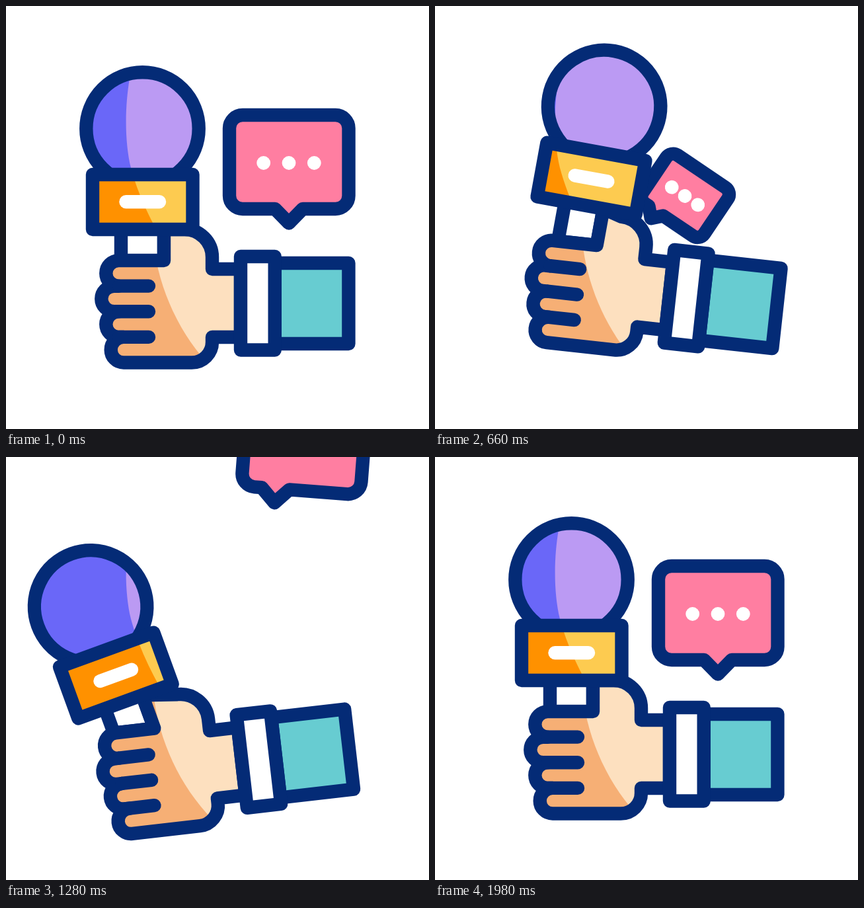
An HTML page with a canvas for the animation above (2400 ms loop, 640 by 640 pixels).

```html
<!DOCTYPE html>
<html lang="en">
<head>
<meta charset="utf-8">
<title>Interview microphone</title>
<style>
  html, body { margin: 0; width: 100%; height: 100%; overflow: hidden; background: #fff; }
  canvas { display: block; }
</style>
</head>
<body>
<canvas id="stage" width="640" height="640"></canvas>
<script>
const ctx = document.getElementById('stage').getContext('2d');
const LOOP = 2400, STEP = 20, LINE = 20.4;
const NAVY = '#042b76', PINK = '#ff7ea1', TEAL = '#67ccd1', WHITE = '#fff';
const BALL = ['#6a67f8', '#bb9af3'], BAND = ['#ff9100', '#fdcb50'], SKIN = ['#f6af75', '#fde0bf'];

// Lit areas stay still on the stage while the shapes pass over them.
const micLight = new Path2D('M200 0L187 110C180 150 179 205 189 245C197 275 209 303 224 332L240 362L640 362L640 0Z');
const handLight = new Path2D('M219 300L222 345C227 420 260 495 312 548L330 565L420 565L420 300Z');

const rad = deg => deg * Math.PI / 180;
const mix = (a, b, p) => a + (b - a) * p;

// cubic-bezier(.5, 0, .5, 1)
function ease(u) {
  let lo = 0, hi = 1;
  for (let i = 0; i < 24; i++) {
    const s = (lo + hi) / 2;
    if (1.5 * s * (1 - s) + s ** 3 < u) lo = s; else hi = s;
  }
  return lo * lo * (3 - 2 * lo);
}

function track(t, times, values, curve = u => u) {
  if (t >= times[times.length - 1]) return values[values.length - 1];
  const i = times.findIndex(x => t < x) - 1;
  return mix(values[i], values[i + 1], curve((t - times[i]) / (times[i + 1] - times[i])));
}

const swing = (t, right, left) => track(t, [0, 430, 1010, 1900], [0, right, left, 0], ease);

function outline(path) {
  ctx.stroke(path);
}

function shape(path, fill) {
  ctx.fillStyle = fill;
  ctx.fill(path);
  outline(path);
}

function litShape(path, [dark, light], region) {
  ctx.fillStyle = dark;
  ctx.fill(path);
  ctx.save();
  ctx.clip(path);
  ctx.resetTransform();
  ctx.fillStyle = light;
  ctx.fill(region);
  ctx.restore();
  outline(path);
}

function box(x0, y0, x1, y1) {
  const p = new Path2D();
  p.rect(x0, y0, x1 - x0, y1 - y0);
  return p;
}

function disc(x, y, r) {
  const p = new Path2D();
  p.arc(x, y, r, 0, 2 * Math.PI);
  return p;
}

function bubblePose(t) {
  if (t < 440) return { x: 428, y: 237.5 - 345 * (t / 440) ** 1.4, turn: 0, size: 1, tail: 0 };
  if (t < 1450) {
    const times = [440, 660, 980, 1080, 1280, 1450];
    return {
      x: track(t, times, [332, 378, 444.5, 452.5, 451, 448]),
      y: track(t, times, [395, 287.5, 131, 81, -18.6, -104]),
      turn: track(t, times, [44.5, 34, 19, 14.1, 4.4, -4]),
      size: 1 - Math.max(0, 1 - (t - 440) / 840) ** 3.2,
      tail: -38
    };
  }
  const rest = Math.max(0, 1 - (t - 1450) / 530);
  return {
    x: 428 - 96 * rest ** 2.1,
    y: 237.5 + 157.5 * rest ** 1.95,
    turn: 44.5 * rest ** 2.4,
    size: 1 - rest ** 2.75,
    tail: 0
  };
}

// Size changes the geometry only: line weight and dots keep their width.
function drawBubble(t) {
  const { x, y, turn, size: k, tail } = bubblePose(t);
  if (k < 0.01) return;
  const l = -90 * k, r = 90.5 * k, top = -72.5 * k, bottom = 69.5 * k, c = 20 * k;
  const p = new Path2D();
  p.moveTo(l + c, top);
  p.arcTo(r, top, r, bottom, c);
  p.arcTo(r, bottom, l, bottom, c);
  p.lineTo((tail + 21) * k, bottom);
  p.lineTo(tail * k, 91 * k);
  p.lineTo((tail - 21) * k, bottom);
  p.arcTo(l, bottom, l, top, c);
  p.arcTo(l, top, r, top, c);
  p.closePath();
  ctx.save();
  ctx.translate(x, y);
  ctx.rotate(rad(turn));
  shape(p, PINK);
  ctx.fillStyle = WHITE;
  for (const i of [-1, 0, 1]) ctx.fill(disc(38.3 * i * k, 0, 10.4));
  ctx.restore();
}

function handPath(grip, top) {
  const p = new Path2D();
  p.moveTo(top.x, top.y);
  p.lineTo(270, 338);
  p.arcTo(312, 338, 312, 380, 42);
  for (const [x, y] of [[312, 398], [355, 398], [355, 501], [312, 501]]) p.lineTo(x, y);
  p.arcTo(312, 539.5, 281, 539.5, 31);
  [178, 170.6, 163.6, 170.6].forEach((x, i) => {
    p.arc(x, 520.2 - 38.6 * i, 19.3, Math.PI / 2, Math.PI * 1.5);
  });
  p.lineTo(grip.x, grip.y);
  p.closePath();
  return p;
}

function drawArm(t) {
  const turn = rad(swing(t, 12.4, -7.85));
  const tilt = rad(swing(t, 12.8, -16.1));
  const px = 206.5 + swing(t, 10.4, -6.5), py = 385 + swing(t, -16, 0);
  const right = 32.5 - swing(t, 6.2, 6.2), left = -32.5;
  const sin = Math.sin(tilt), cos = Math.cos(tilt);
  const fromMic = (x, y) => ({ x: px + x * cos - y * sin, y: py + x * sin + y * cos });
  // Where a side of the handle meets the top of the fist
  const foot = x => fromMic(x, (385 - py - x * sin) / cos);

  ctx.save();
  ctx.translate(450, 440);
  ctx.rotate(turn);
  ctx.translate(-450, -440);

  const grip = foot(right), top = fromMic(right, -47);
  const handle = new Path2D();
  [fromMic(left, -47), foot(left), grip, top].forEach(q => handle.lineTo(q.x, q.y));
  shape(handle, WHITE);

  litShape(handPath(grip, top), SKIN, handLight);
  const gaps = new Path2D();
  for (const y of [423.6, 462.2, 500.9]) {
    gaps.moveTo(171, y);
    gaps.lineTo(216, y);
  }
  outline(gaps);

  shape(box(406.7, 389, 518.4, 511), TEAL);
  shape(box(355, 379, 406.7, 520.5), WHITE);

  ctx.translate(px, py);
  ctx.rotate(tilt);
  litShape(disc(0, -199.5, 85.2), BALL, micLight);
  litShape(box(-75.5, -130, 76, -47), BAND, micLight);
  const slot = new Path2D('M-25 -88.7H25.5');
  ctx.strokeStyle = WHITE;
  outline(slot);
  ctx.restore();
}

function draw(now) {
  const t = Math.floor(now % LOOP / STEP) * STEP;
  ctx.fillStyle = WHITE;
  ctx.fillRect(0, 0, 640, 640);
  ctx.strokeStyle = NAVY;
  ctx.lineWidth = LINE;
  ctx.lineJoin = ctx.lineCap = 'round';
  drawBubble(t);
  drawArm(t);
}

let start;
function tick(now) {
  start ??= now;
  draw(now - start);
  requestAnimationFrame(tick);
}
draw(0);
requestAnimationFrame(tick);
</script>
</body>
</html>
```
